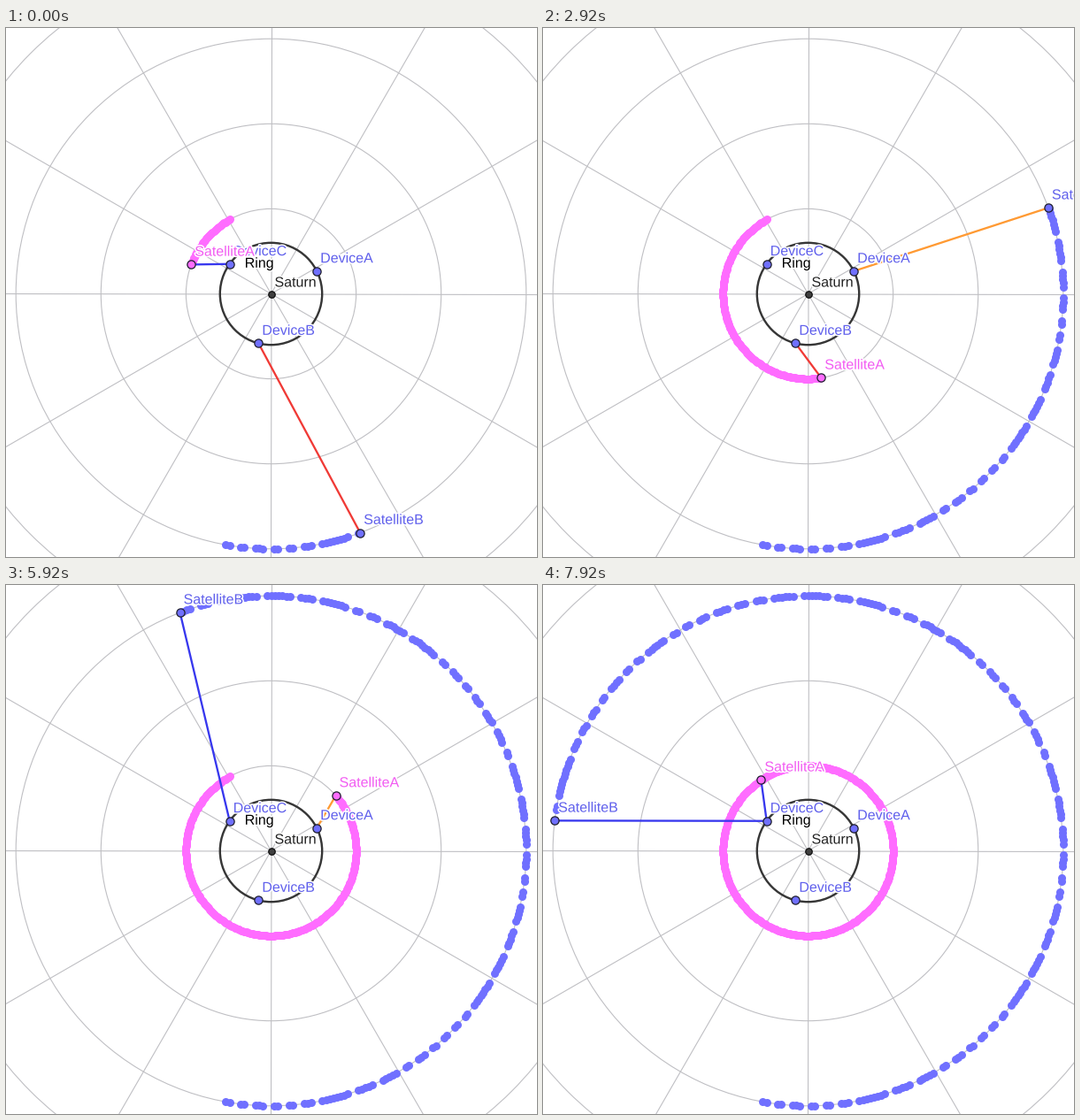
A matplotlib script for the animation above (8 s loop, 600 px wide and 598 px high).

```python
import random

import numpy as np
import matplotlib
import matplotlib.pyplot as plt
import matplotlib.patheffects as pe
from matplotlib.animation import FuncAnimation

matplotlib.rcParams["font.family"] = "Liberation Sans"

W, H, DPI = 600, 598, 64
PT = 72 / DPI                      # points per pixel
INTERVAL, LOOP = 40, 8000          # ms
STEPS, LEAD = 96, 34               # motion steps per loop, head start in ms
CX, CY = 299.5, 300.5
GRID = 96.1
RING_R, ORBIT_A, ORBIT_B = 57.7, GRID, 3 * GRID
START_A, START_B = 119.0, -100.2   # where the trails begin, degrees

BLUE, PINK, GREY = "#7070ff", "#ff6cff", "#bfbfc3"
BLUE_INK, PINK_INK = "#6060ec", "#f25cf2"
DEVICES = {
    "DeviceA": (26.4, "#ff9a33"),
    "DeviceB": (-104.2, "#f03a36"),
    "DeviceC": (144.2, "#3737ee"),
}


def polar(radius, deg):
    a = np.radians(deg)
    return CX + radius * np.cos(a), CY - radius * np.sin(a)


def outer_angle(step):
    """Nearly constant speed, a little slower around two thirds."""
    return np.interp(step, [0, 49, 62, 95], [-69.55, 55.4, 87.55, 173.2])


def dashed_trail(start, end, spacing=0.85, gap=2.5):
    """Runs of close dots with a wider jump after each run."""
    rng = random.Random(4)
    dots, deg = [], start
    while deg < end:
        for _ in range(2 + min(9, int(rng.expovariate(1 / 2.4)))):
            dots.append(deg)
            deg += spacing
        deg += gap - spacing
    return np.array(dots)


def sees(sat_deg, orbit, dev_deg):
    """True while the device's horizon does not hide the satellite."""
    return np.cos(np.radians(sat_deg - dev_deg)) > RING_R / orbit


fig = plt.figure(figsize=(W / DPI, H / DPI), dpi=DPI, facecolor="white")
ax = fig.add_axes([0, 0, 1, 1])
ax.set_xlim(0, W)
ax.set_ylim(H, 0)
ax.axis("off")


def circle(radius, color, width, z):
    ax.add_patch(plt.Circle((CX, CY), radius, fill=False, ec=color,
                            lw=width * PT, zorder=z))


def point(x, y, fill, size=9.2, edge="#222233"):
    dot, = ax.plot([x], [y], "o", ms=size * PT, mfc=fill, mec=edge,
                   mew=1.3 * PT, zorder=5, snap=False)
    return dot


def label(x, y, text, color, z=6):
    halo = [pe.withStroke(linewidth=3 * PT, foreground="white")]
    return ax.text(x, y, text, color=color, fontsize=16 * PT, ha="left",
                   va="baseline", zorder=z, path_effects=halo)


class Satellite:
    def __init__(self, name, orbit, fill, ink, dots):
        self.orbit, self.dots = orbit, dots
        self.trail, = ax.plot([], [], "o", ms=9 * PT, mew=0, color=fill,
                              zorder=2, snap=False)
        self.links = {
            dev: ax.plot([], [], color=c, lw=2.3 * PT, zorder=4)[0]
            for dev, (_, c) in DEVICES.items()
        }
        self.dot = point(0, 0, fill)
        self.label = label(0, 0, name, ink, 7)

    def move(self, deg):
        x, y = polar(self.orbit, deg)
        self.trail.set_data(*polar(self.orbit, self.dots[self.dots <= deg]))
        self.dot.set_data([x], [y])
        self.label.set_position((x + 4, y - 9.8))
        for dev, link in self.links.items():
            dev_deg = DEVICES[dev][0]
            dx, dy = polar(RING_R, dev_deg)
            link.set_data([x, dx], [y, dy])
            link.set_visible(bool(sees(deg, self.orbit, dev_deg)))


for k in range(1, 5):
    circle(GRID * k, GREY, 1.1, 1)
for deg in range(0, 180, 30):
    (x0, y0), (x1, y1) = polar(600, deg), polar(600, deg + 180)
    ax.plot([x0, x1], [y0, y1], color=GREY, lw=1.1 * PT, zorder=1)

circle(RING_R, "#363636", 2.4, 3)
point(CX, CY, "#404040", 7.4, "#111111")
for dev, (deg, _) in DEVICES.items():
    x, y = polar(RING_R, deg)
    point(x, y, BLUE)
    label(x + 4, y - 9.6, dev, BLUE_INK)
label(CX - 29.8, CY - 29.7, "Ring", "black")
label(CX + 4, CY - 8, "Saturn", "#222222")

sat_b = Satellite("SatelliteB", ORBIT_B, BLUE, BLUE_INK,
                  dashed_trail(START_B, 176))
sat_a = Satellite("SatelliteA", ORBIT_A, PINK, PINK_INK,
                  np.arange(START_A, START_A + 370, 0.9))


def update(i):
    step = int((i * INTERVAL + LEAD) * STEPS / LOOP)
    deg = outer_angle(step)
    sat_b.move(deg)
    sat_a.move(START_A + (deg - START_B) * 4 / 3)
    return []


anim = FuncAnimation(fig, update, frames=LOOP // INTERVAL, interval=INTERVAL,
                     init_func=lambda: update(0), repeat=True,
                     repeat_delay=0, blit=False)
plt.show()
```
